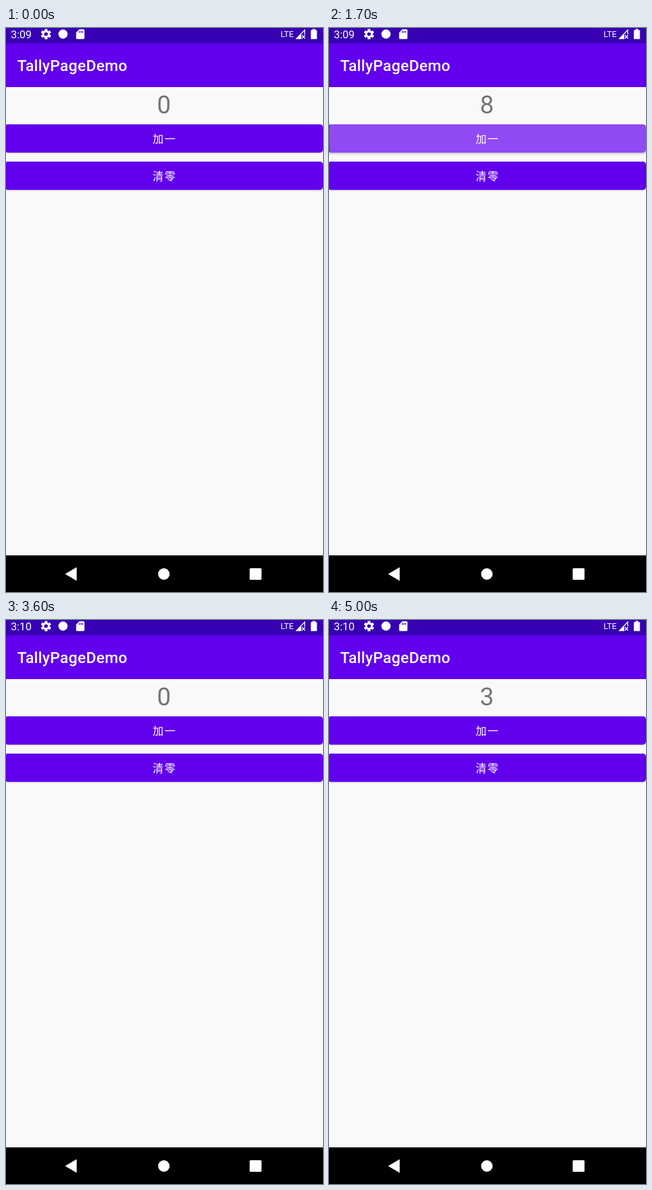
These frames come from a looping animation (495x878 px, 5300 ms). An HTML page:

```html
<!DOCTYPE html>
<html lang="zh-CN">
<head>
<meta charset="utf-8">
<title>Counter</title>
<style>
  html, body { margin: 0; width: 100%; height: 100%; overflow: hidden; background: #f9f9f9; }
  svg { display: block; width: 100%; height: 100%; }
  text { font-family: Roboto, "Noto Sans", sans-serif; fill: #fff; }
  .title { font-size: 24.1px; font-weight: 500; letter-spacing: .3px; }
  .clock { font-size: 16.9px; }
  .net { font-size: 13px; }
  .count { font-size: 38.6px; fill: #757575; text-anchor: middle; }
  .label { font-family: "Noto Sans CJK SC", "Noto Sans CJK", sans-serif; font-size: 17px; letter-spacing: 1.5px; }
  .face { fill: #6200ee; filter: drop-shadow(0 1px 1px rgba(0, 0, 0, .2)); }
  .face.down { filter: drop-shadow(0 2px 1.5px rgba(0, 0, 0, .22)); }
</style>
</head>
<body>
<svg viewBox="0 0 495 878">
  <rect width="495" height="878" fill="#f9f9f9"/>

  <rect width="495" height="24" fill="#3700b3"/>
  <text class="clock" id="clock" x="7.5" y="16.3">3:09</text>
  <g fill="#fff">
    <g transform="translate(62.5 9.5)">
      <circle r="5.8"/>
      <g id="teeth"></g>
      <circle r="2.8" fill="#3700b3"/>
    </g>
    <circle cx="89" cy="9.5" r="7.2"/>
    <path d="M114.5 2H121a1.5 1.5 0 0 1 1.5 1.5V15.700a1.500 1.500 0 0 1-1.500 1.500H111a1.500 1.500 0 0 1-1.500-1.500V7z"/>
    <path d="M114.500 4.500v3M117 4.500v3M119.500 4.500v3" stroke="#3700b3" stroke-width="1.300"/>
    <path d="M478.500 1.500h4.500v1.700h2.500v14h-9.500v-14h2.500z"/>
    <path d="M453 16.500L461 8.500V16.500z"/>
  </g>
  <text class="net" x="428.700" y="14.300">LTE</text>
  <path d="M461 16.500H453.500L466.500 3.200V10" fill="none" stroke="#fff" stroke-width="1.300"/>
  <path d="M462 11.200l5 5m0-5l-5 5" stroke="#fff" stroke-width="1.500"/>

  <rect y="24" width="495" height="68" fill="#6200ee"/>
  <text class="title" x="17.500" y="67">TallyPageDemo</text>

  <text class="count" id="count" x="246.500" y="133">0</text>
  <g id="buttons"></g>

  <rect y="821" width="495" height="57"/>
  <g fill="#fff">
    <path d="M93 850L110 840V860z" stroke="#fff" stroke-width=".8" stroke-linejoin="round"/>
    <circle cx="246.500" cy="850" r="9"/>
    <rect x="380.500" y="841" width="18.500" height="18" rx="1.500"/>
  </g>
</svg>
<script>
const LOOP = 5300, STEP = 100;
const GROW = 225, FADE_IN = 75, FADE_OUT = 120, CLICK = 95;
const BOX = { x: -2, w: 497, h: 44 };
const TOUCH_X = 344, PEAK = 0.25;

const buttons = [
  { label: '加一', y: 150, presses: [405, 550, 715, 885, 1040, 1195, 1379, 1513, 1700, 1879, 2151, 4260, 4444, 4600] },
  { label: '清零', y: 208, presses: [2730] }
];
const [add, clear] = buttons;

const byId = id => document.getElementById(id);
const clamp = v => Math.min(1, Math.max(0, v));
const mix = (a, b, p) => a + (b - a) * p;

function make(parent, tag, attrs) {
  const el = document.createElementNS('http://www.w3.org/2000/svg', tag);
  for (const key in attrs) el.setAttribute(key, attrs[key]);
  return parent.appendChild(el);
}

// cubic-bezier(.4, 0, .2, 1), solved by bisection
function ease(x) {
  let lo = 0, hi = 1;
  for (let i = 0; i < 24; i++) {
    const s = (lo + hi) / 2, r = 1 - s;
    if (1.2 * r * r * s + 0.6 * r * s * s + s * s * s < x) lo = s; else hi = s;
  }
  return lo * lo * (3 - 2 * lo);
}

for (const angle of [0, 60, 120])
  make(byId('teeth'), 'rect', { x: -2.2, y: -8, width: 4.4, height: 16, rx: 0.6, transform: `rotate(${angle})` });

buttons.forEach((b, i) => {
  const root = byId('buttons');
  const shape = { x: BOX.x, y: b.y, width: BOX.w, height: BOX.h, rx: 4.8 };
  b.face = make(root, 'rect', { ...shape, class: 'face' });
  make(make(root, 'clipPath', { id: 'clip' + i }), 'rect', shape);
  const layer = make(root, 'g', { 'clip-path': `url(#clip${i})`, fill: '#fff' });
  b.ripples = b.presses.map(() => make(layer, 'circle', { opacity: 0 }));
  make(root, 'text', { class: 'label', x: 229, y: b.y + 29 }).textContent = b.label;
});

function drawButton(b, t) {
  let down = false;
  b.presses.forEach((start, i) => {
    const age = t - start, live = age > 0 && age < GROW + FADE_OUT;
    const p = ease(clamp(age / GROW));
    const alpha = live ? PEAK * clamp(age / FADE_IN) * (1 - clamp((age - GROW) / FADE_OUT)) : 0;
    const ripple = b.ripples[i];
    ripple.setAttribute('cx', mix(TOUCH_X, BOX.x + BOX.w / 2, p));
    ripple.setAttribute('cy', mix(b.y + 15, b.y + BOX.h / 2, p));
    ripple.setAttribute('r', mix(BOX.w * 0.3, Math.hypot(BOX.w, BOX.h) / 2, p));
    ripple.setAttribute('opacity', alpha);
    down = down || (live && age < GROW);
  });
  b.face.classList.toggle('down', down);
}

function render(now) {
  const t = Math.floor((now % LOOP) / STEP) * STEP;
  const reset = clear.presses[0] + CLICK;
  const from = t >= reset ? reset : 0;
  const total = add.presses.filter(s => s + CLICK > from && s + CLICK <= t).length;
  byId('count').textContent = total;
  byId('clock').textContent = t < 3600 ? '3:09' : '3:10';
  buttons.forEach(b => drawButton(b, t));
}

const begin = performance.now();
function tick(now) {
  render(Math.max(0, now - begin));
  requestAnimationFrame(tick);
}
render(0);
requestAnimationFrame(tick);
</script>
</body>
</html>
```
